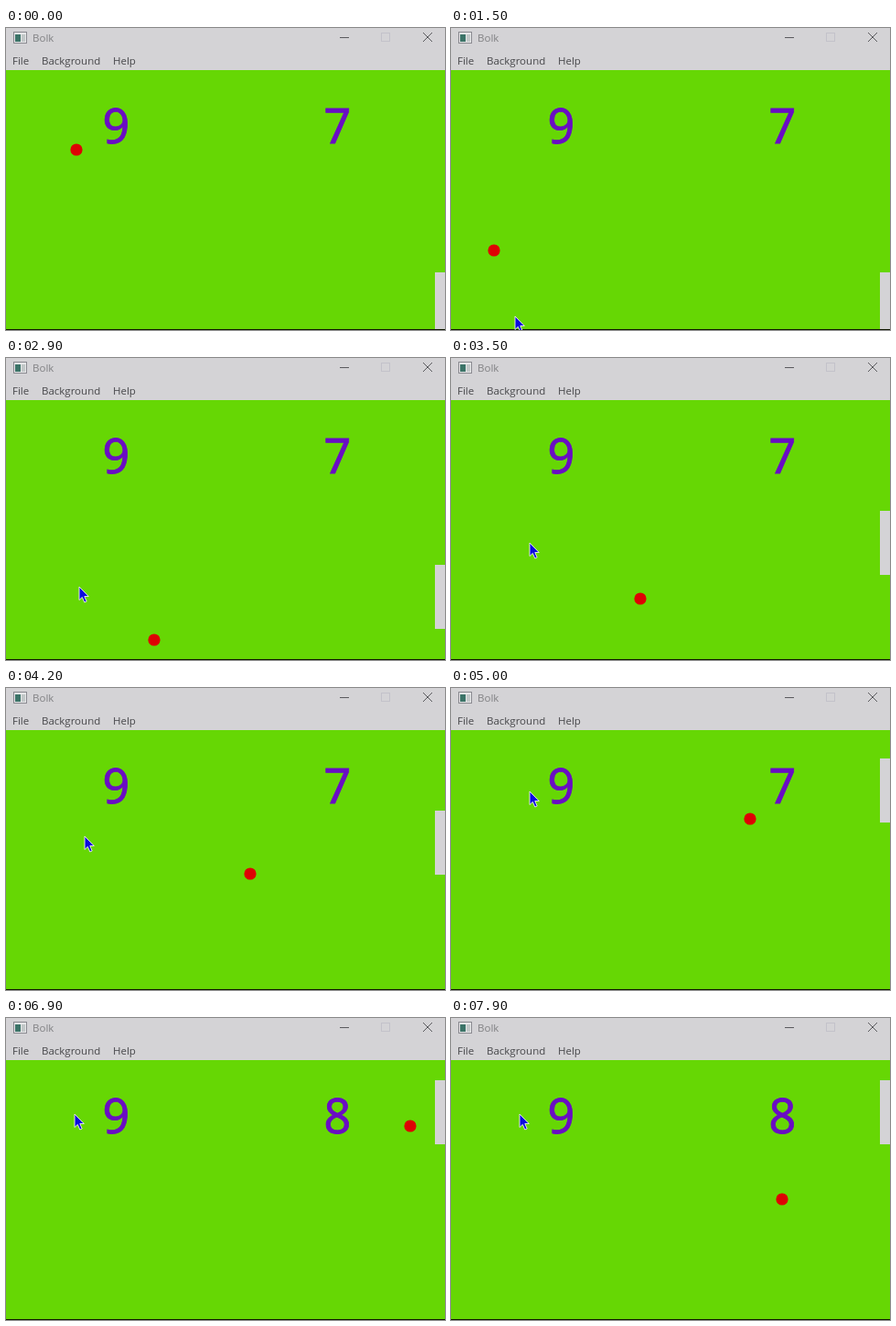
Recreate the animation shown at these times as an HTML page. Size 480 px wide and 330 px high, loop 8 s.

```html
<!DOCTYPE html>
<html lang="en">
<head>
<meta charset="utf-8">
<title>Bolk</title>
<style>
  html, body { margin: 0; width: 100%; height: 100%; overflow: hidden; background: #66d704; }
  svg { display: block; width: 480px; height: 330px; }
  .ui { font: 11.5px "Open Sans", "Noto Sans", sans-serif; fill: #47474a; }
  .title { fill: #818184; }
  .score {
    font: 52px "Noto Sans", "Open Sans", sans-serif; text-anchor: middle;
    fill: #6a0cc4; stroke: #6a0cc4; stroke-width: .8;
  }
  .chrome { fill: #d4d3d6; }
  .line { fill: none; stroke: #5a5a5e; }
</style>
</head>
<body>
<svg viewBox="0 0 480 330">
  <rect width="480" height="330" fill="#66d704"/>
  <text class="score" x="120.3" y="125.8">9</text>
  <text class="score" x="362.3" y="125.8" id="score">7</text>
  <rect class="chrome" id="paddle" x="469" width="11" height="70"/>
  <circle id="ball" r="6.6" fill="#de0204"/>

  <rect class="chrome" width="480" height="46"/>
  <g id="icon">
    <rect x="8.5" y="4.5" width="14" height="12" fill="#e6e6e8" stroke="#8a8a90"/>
    <rect x="10" y="7" width="6" height="8" fill="#3c7468"/>
    <rect x="17" y="7" width="4" height="8" fill="#c2c8c8"/>
  </g>
  <text class="ui title" x="29" y="15">Bolk</text>
  <text class="ui" x="7" y="40">File</text>
  <text class="ui" x="39" y="40">Background</text>
  <text class="ui" x="117" y="40">Help</text>
  <path class="line" d="M365 10.5h10M456 5l10 10M466 5l-10 10"/>
  <rect x="410.5" y="5.5" width="9" height="9" fill="none" stroke="#c3c2ca"/>

  <rect y="329" width="480" height="1" fill="#101800"/>
  <path id="cursor" d="M0 0V14.5L3.3 11.4 5.8 17 8.2 16 5.8 10.5H10.3Z"
        fill="#0a0ae0" stroke="#f0f0f0" stroke-width=".9"/>
</svg>
<script>
  const LOOP = 8000, STEP = 100, TICK = 5, SPEED = 0.0805, DELAY = 130;
  const [ball, paddle, cursor, score] =
    ["ball", "paddle", "cursor", "score"].map(id => document.getElementById(id));

  // Resting points of the mouse, eased between
  const stops = [
    { t: 1200, x: 70, y: 334 }, { t: 1500, x: 70, y: 315 },
    { t: 2200, x: 73, y: 311 }, { t: 3500, x: 86, y: 202 },
    { t: 5000, x: 86, y: 113 }, { t: 5900, x: 82, y: 86 },
    { t: 6500, x: 75, y: 105 }
  ];

  const clamp = (v, lo, hi) => Math.min(hi, Math.max(lo, v));

  function mouse(t) {
    const i = clamp(stops.findLastIndex(s => s.t <= t), 0, stops.length - 2);
    const a = stops[i], b = stops[i + 1];
    const p = clamp((t - a.t) / (b.t - a.t), 0, 1), e = p * p * (3 - 2 * p);
    return { x: Math.round(a.x + (b.x - a.x) * e), y: Math.round(a.y + (b.y - a.y) * e) };
  }

  // Travel d from start, moving between two walls
  function bounce(start, d, lo, hi) {
    const span = hi - lo, u = (start - lo + d) % (2 * span);
    return lo + span - Math.abs(span - Math.abs(u));
  }

  function place(el, x, y) {
    el.setAttribute("transform", `translate(${x} ${y})`);
  }

  function draw() {
    const t = Math.floor(performance.now() % LOOP / STEP) * STEP;
    const path = TICK * Math.round(Math.max(0, t - DELAY) * SPEED / TICK);
    const tip = mouse(t);
    place(ball, bounce(77, -path, 7, 462), bounce(133, path, 53, 333));
    place(cursor, tip.x, tip.y);
    // The paddle follows the mouse one step late
    place(paddle, 0, clamp(mouse(t - STEP).y - 37, 46, 267));
    score.textContent = path < 525 ? 7 : 8;
    requestAnimationFrame(draw);
  }
  draw();
</script>
</body>
</html>
```
